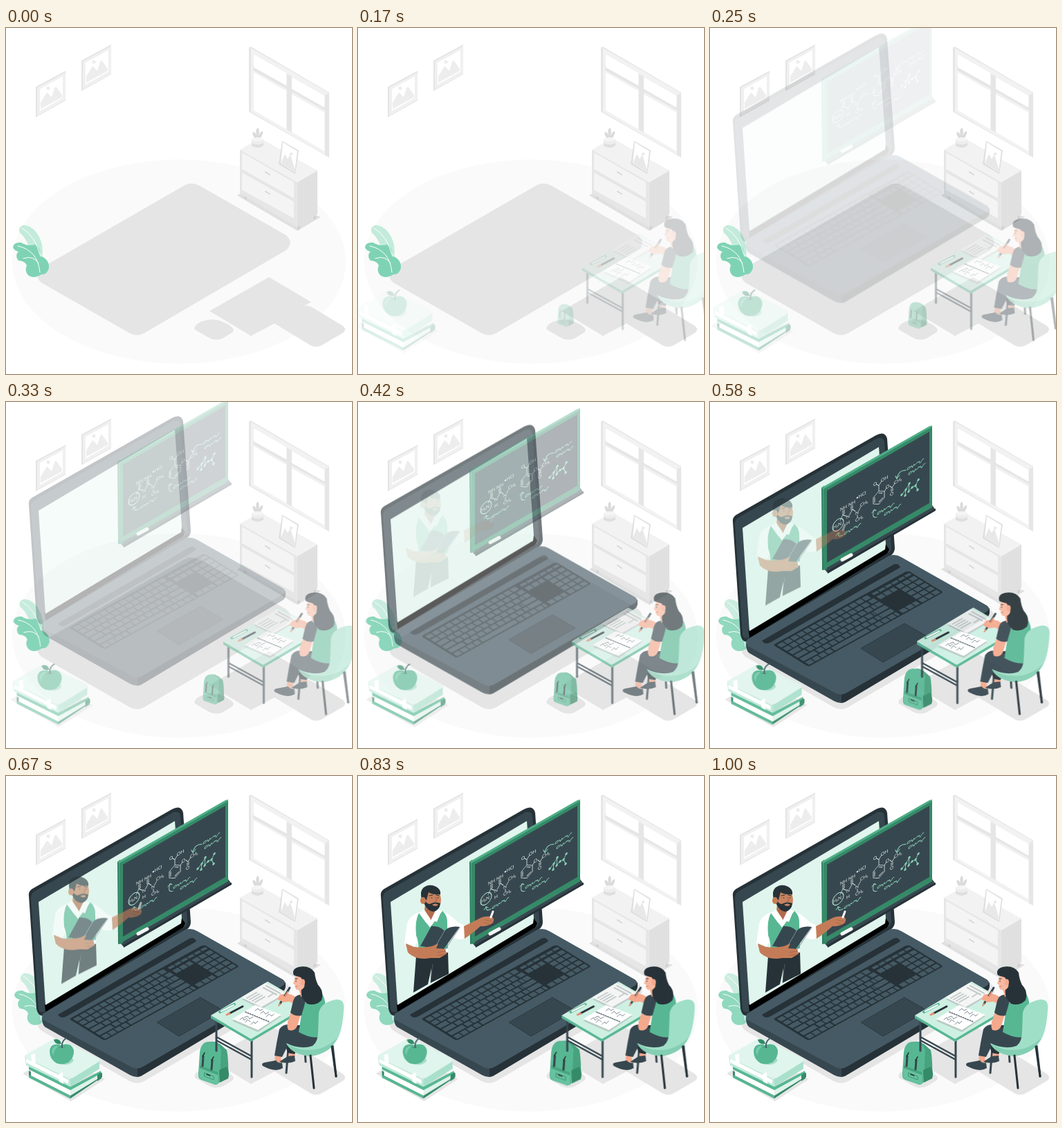
These frames come from a looping animation (500x500 px, 1040 ms). An HTML page:

```html
<!DOCTYPE html>
<html lang="en">
<head>
<meta charset="utf-8">
<title>Online chemistry lesson</title>
<style>
html, body { margin: 0; width: 100%; height: 100%; overflow: hidden; background: #fff; }
svg { display: block; width: 100%; height: 100%; }
text { font: 6.5px Lato, sans-serif; fill: #e6f1ed; }
.ln { fill: none; stroke-linecap: round; stroke-linejoin: round; }

/* 25 pictures per loop, 4% each */
.part { animation: 1040ms linear -4ms infinite; }
#plant { animation-name: pale; }
#laptop { animation-name: drop; }
#board { animation-name: hang; }
#teacher { animation-name: enter; }
#books { --side: -1px; animation-name: slide; }
#student { --side: 1px; animation-name: slide; }
#bag { transform-origin: 300px 416px; animation-name: grow; }

@keyframes pale {
  0%, 24% { opacity: 1; transform: none; animation-timing-function: steps(6); }
  48%, 100% { opacity: .86; transform: translateX(2px); }
}
/* fades gather speed while the moves stay even */
@keyframes drop {
  0%, 16% { opacity: 0; transform: translateY(-50px); animation-timing-function: steps(4); }
  32% { opacity: .28; transform: translateY(-25px); animation-timing-function: steps(4); }
  48%, 100% { opacity: 1; transform: translateY(0); }
}
@keyframes hang {
  0%, 20% { opacity: 0; transform: translateY(-56.25px); animation-timing-function: steps(5); }
  40% { opacity: .4; transform: translateY(-25px); animation-timing-function: steps(4); }
  56%, 100% { opacity: 1; transform: translateY(0); }
}
@keyframes enter {
  0%, 32% { opacity: 0; transform: translateY(-37.5px); animation-timing-function: steps(4); }
  48% { opacity: .21; transform: translateY(-25px); animation-timing-function: steps(8); }
  80%, 100% { opacity: 1; transform: translateY(0); }
}
@keyframes slide {
  0%, 4% { opacity: 0; transform: translateX(calc(var(--side) * 35)); animation-timing-function: steps(14); }
  60% { opacity: 1; transform: translateX(0); }
  64% { transform: translateX(0); animation-timing-function: steps(3); }
  76% { transform: translateX(calc(var(--side) * -2)); animation-timing-function: steps(5); }
  96%, 100% { opacity: 1; transform: translateX(0); }
}
@keyframes grow {
  0%, 4% { opacity: 0; transform: scale(.4); animation-timing-function: steps(14); }
  60% { opacity: 1; transform: scale(1); }
  64% { transform: scale(1); animation-timing-function: steps(3); }
  76% { transform: scale(1.05); animation-timing-function: steps(5); }
  96%, 100% { opacity: 1; transform: scale(1); }
}
</style>
</head>
<body>
<svg viewBox="0 0 500 500">
<defs>
  <g id="picture">
    <path fill="#e4e4e4" d="M43 85 86 62V105L43 129Z"/>
    <path fill="#f0f0f0" d="M45 86 86 64V104L45 127Z"/>
    <path fill="#fff" d="M49 88 82 70V101L49 120Z"/>
    <path fill="#ededed" d="M50 117V108L58 95Q60 92 62 96L66 100 70 87Q72 83 74 87L81 97V100Z"/>
    <circle cx="61" cy="87" r="2.6" fill="#ededed"/>
  </g>
  <path id="squiggle" class="ln" stroke-width=".9" d="M4-3Q0-3 0-1T4-1Q7-4 7-1T10-3Q10 0 13-2T16-2Q18-4 18-1T22-3L24-3"/>
</defs>

<ellipse cx="250" cy="337.500" rx="241" ry="147.500" fill="#fafafa"/>

<g id="room">
  <use href="#picture"/>
  <use href="#picture" x="66" y="-38"/>
  <path fill="#e6e6e6" d="M351 28 354 27 467 93V187L351 121Z"/>
  <path fill="#f2f2f2" d="M354 29 467 94 464 185 354 121Z"/>
  <path fill="#e6e6e6" d="M461 97 467 94V187L461 184ZM406 66 413 70V151L406 147ZM357 54 461 114V119L357 61Z"/>
  <path fill="#fff" d="M358 38 405 65V83L358 57ZM358 64 405 91V146L358 119ZM413 71 460 98V115L413 88ZM413 96 460 122V178L413 150Z"/>

  <path fill="#e0e0e0" d="M334 242 342 237 455 273 421 293Z"/>
  <path class="ln" stroke="#cfcfcf" stroke-width="3" d="M346 240V246M423 285V290M446 270V275"/>
  <path fill="#f2f2f2" d="M338 176 367 159 450 206 421 223Z"/>
  <path fill="#e6e6e6" d="M338 176 421 223V288L338 239Z"/>
  <path fill="#e0e0e0" d="M421 223 450 206V269L421 288Z"/>
  <path fill="#f4f4f4" d="M341 180 416 223V246L341 204ZM341 209 416 251V275L341 234Z"/>
  <path class="ln" stroke="#d8d8d8" stroke-width="2" d="M375 208 381 212M375 236 381 240"/>
  <path fill="#dadada" d="M361 161Q355 154 357 150 361 151 362 156 360 146 364 144 367 147 365 156 367 150 371 149 372 154 366 161Z"/>
  <path fill="#ededed" d="M355 161H372V170Q364 176 355 170Z"/>
  <path fill="#dfdfdf" d="M355 166Q364 171 372 166V170Q364 176 355 170Z"/>
  <ellipse cx="363.500" cy="161" rx="8.500" ry="3" fill="#f5f5f5"/>
  <path fill="#dfdfdf" d="M399 163 423 177 418 211 394 197Z"/>
  <path fill="#fff" d="M400 165 421 178 417 208 397 196Z"/>
  <path fill="#e8e8e8" d="M397 196 403 182 407 189 411 183 418 206 416 207Z"/>
  <circle cx="412" cy="182" r="2" fill="#e8e8e8"/>
</g>

<g id="shadows" fill="#e5e5e5">
  <path d="M255 229Q267 221 280 228L404 299Q417 309 405 321L203 439Q190 448 177 440L51 368Q39 358 54 345Z"/>
  <path d="M294 409 380 360 441 396 430 402Q437 400 443 404L486 430Q494 436 486 441L457 458Q449 463 441 459L388 427 354 445Z"/>
  <path d="M273 436Q270 430 283 424 300 418 314 425 334 434 327 440L314 448Q304 453 294 448Z"/>
</g>

<g id="plant" class="part">
  <path fill="#c3ebdc" d="M52 333Q36 325 30 309 26 301 20 296 16 288 25 285 39 285 48 302 55 315 52 333Z"/>
  <path fill="#7fd3b5" d="M10 317Q11 309 22 310 31 316 42 313 50 317 49 329 63 334 62 347 59 357 51 356 41 363 33 358 26 352 30 343 28 337 18 336 12 329 18 323 12 322 10 317Z"/>
  <path class="ln" stroke="#fff" d="M23 289Q42 300 50 330M17 315Q46 321 49 353M25 333Q40 328 47 340"/>
</g>

<g id="laptop" class="part">
  <path fill="#263238" d="M44 336 33 173Q32 167 38 163L240 48Q253 41 256 53L267 211Q267 218 261 222L55 346Q46 348 44 336Z"/>
  <path fill="#37474f" d="M47 336 36 177Q36 170 41 167L239 54Q250 48 252 58L262 210Q262 216 257 219L57 340Q49 344 47 336Z"/>
  <path fill="#000" d="M56 330 253 204 259 213 256 219 57 341Z"/>
  <path fill="#e0f5ed" d="M47 182 244 65 254 205 253 213 57 331Z"/>
  <path fill="#37474f" d="M52 349 190 421V435Q184 435 179 432L57 363Q52 360 52 349Z"/>
  <path fill="#263238" d="M190 421 404 298V304Q404 309 399 312L198 432Q194 435 190 435Z"/>
  <path fill="#455a64" d="M54 343 259 222Q268 219 276 224L400 294Q407 299 400 303L198 420Q190 425 182 421L55 353Q50 348 54 343Z"/>
  <path fill="#263238" d="M75 345 265 235Q272 232 275 239L88 347Q80 352 75 345Z"/>
  <g transform="matrix(9.6 -5.3 8.1 5 93 351)">
    <path fill="#263238" d="M.2-.1H19.800Q20.200 0 20.200.3V5.900Q20.200 6.200 19.900 6.200H.2Q-.1 6.200-.1 5.900V.2Q-.1-.1.2-.1Z"/>
    <g fill="none" stroke="#455a64" stroke-width=".76" stroke-dasharray=".82 .16">
      <path d="M.2.6H13.900M.2 1.600H13M1.800 2.600H13M2 3.600H12M2.600 4.600H12M.2 5.600H3.900M9.600 5.600H13.900"/>
      <path d="M14.300 1.600H16.900M14.300 5.600H16.900M17.200 1.600H20M17.200 2.600H20M17.200 3.600H20M17.200 4.600H20M17.200 5.600H20"/>
      <path stroke-width=".45" d="M14.300.6H20"/>
      <path stroke-dasharray="none" d="M.2 2.600H1.600M.2 3.600H1.800M.2 4.600H2.400M4.100 5.600H9.400M13.100 1.600H13.900M13.100 2.600H13.900M12.100 3.600H13.900M12.100 4.600H13.900"/>
    </g>
  </g>
  <path fill="#37474f" stroke="#2b3a42" d="M218 356 281 320 314 339 250 376Z"/>
</g>

<g id="board" class="part">
  <path fill="#37474f" d="M163 239 321 149 326 156 170 247Z"/>
  <path fill="#263238" d="M170 244 326 154V157L170 248Z"/>
  <path fill="#2f7d5e" d="M161 124 165 121 169 242 162 243Z"/>
  <path fill="#4fae88" d="M161 124 317 35 321 34V152L164 242 163 126Z"/>
  <path fill="#358a68" d="M164 126 321 36V152L164 242Z"/>
  <path fill="#37474f" d="M169 128 317 43V146L169 232Z"/>
  <path class="ln" stroke="#f5f5f5" stroke-width="5" d="M191 228 204 221"/>
  <g transform="matrix(1 -.565 0 1 169 127)">
    <text x="19" y="42">NH</text><text x="31" y="42">NH</text><text x="42" y="38">•HCl</text>
    <text x="48" y="52">CH₃</text><text x="28" y="58">N</text><text x="41" y="60">N</text>
    <text x="28" y="67">H</text><text x="41" y="70">CH₃</text><text x="9" y="62">H₂N</text>
    <text x="67" y="33">O</text><text x="78" y="33">OH</text><text x="85" y="47">O</text>
    <text x="91" y="61">O</text><text x="97" y="47">CH₃</text>
    <g class="ln" stroke="#e6f1ed" stroke-width=".8">
      <path d="M23 43V49L28 54M23 49 19 55M25 43V49M33 54 37 49 41 54M35 43V49M37 43V49M46 56 49 52M44 61V65"/>
      <path d="M75 44 83 49V58L75 63 67 58V49ZM75 47 80 50M81 57 75 60M69 57V50M75 44V36L71 32M75 36 79 32M83 49 86 46M91 46 94 50 98 46M93 51V55M95 51V55"/>
    </g>
    <g stroke="#8ad3b7" fill="none">
      <circle cx="16" cy="59.500" r="8" stroke="#b8e8d6"/>
      <path class="ln" d="M23 78Q16 79 16 71M13 74 16 71 19 74M72 80Q64 78 68 68M65 70 68 67 71 70M114 36Q104 30 101 40M99 36 101 41 105 38"/>
      <use href="#squiggle" x="25" y="79"/>
      <use href="#squiggle" x="73" y="77"/>
      <use href="#squiggle" x="83" y="84"/>
      <use href="#squiggle" x="116" y="37"/>
      <use href="#squiggle" x="118" y="45"/>
      <path class="ln" d="M108 68 114 64 119 58 118 68 123 66 128 66 132 60M128 66 131 74M114 64 113 72"/>
      <path class="ln" stroke-width="3.400" d="M108 68h.1M114 64h.1M119 58h.1M118 69h.1M123 66h.1M128 66h.1M132 60h.1M131 74h.1M113 72h.1"/>
    </g>
  </g>
</g>

<g id="teacher" class="part">
  <path fill="#263238" d="M84 260 130 254 131 286 105 299 106 278 101 301 80 313Z"/>
  <path class="ln" stroke="#455a64" d="M108 272 105 298"/>
  <path fill="#fff" d="M94 195Q75 200 71 213L67 243 80 248 86 240 88 262 130 255V226Q138 239 153 235L157 217 147 213 131 200 118 194Z"/>
  <path fill="#c47c58" d="M153 217Q168 210 177 205 184 202 193 203 198 206 195 212 188 218 177 217 165 228 154 235 149 229Z"/>
  <path class="ln" stroke="#a5603f" stroke-width=".8" d="M184 208 193 210M183 212 190 214"/>
  <path class="ln" stroke="#fff" stroke-width="3" d="M192 204 195 196"/>
  <path fill="#57b793" d="M88 198 104 219 122 195Q130 202 129 214L130 249 87 258Q89 243 84 230 82 209 88 198Z"/>
  <path fill="#b36c49" d="M97 183 112 188 113 201 105 208 96 198Z"/>
  <path fill="#fff" d="M95 192 105 207 99 213 89 199ZM113 192 120 196 114 211 106 207Z"/>
  <path fill="#c98360" d="M96 170Q105 162 118 167L120 178Q120 191 111 194 102 195 97 185Z"/>
  <path fill="#263238" d="M93 181Q88 167 95 161 103 155 113 160 120 164 119 171 109 172 102 168L99 179 97 180Q101 187 106 184 112 181 119 184 118 194 109 196 100 195 96 185Z"/>
  <ellipse cx="94" cy="180" rx="4" ry="5" fill="#c47c58"/>
  <path fill="#c98360" d="M107 186Q112 183 116 186 112 190 107 186Z"/>
  <path class="ln" stroke="#263238" d="M103 173 108 172M113 172 117 173M106 176h1M115 176h1"/>
  <path class="ln" stroke="#a5603f" d="M112 175 114 180 111 181"/>
  <path fill="#37474f" d="M90 246 106 217Q118 216 125 224 132 216 147 218L124 250Q113 249 108 255 100 245 90 246Z"/>
  <path class="ln" stroke="#78909c" d="M125 224 108 253M147 219 125 252"/>
  <path fill="#c47c58" d="M69 242 81 247Q94 249 107 246L116 242 113 249 126 250 128 257 118 263 105 263Q84 267 72 255Z"/>
  <path class="ln" stroke="#a5603f" stroke-width=".8" d="M115 255 126 253M115 259 124 258"/>
</g>

<g id="books" class="part">
  <path fill="#e5e5e5" d="M24 430 75 401 143 438 94 470Z"/>
  <path fill="#358a68" d="M33 426 93 454 139 429V435L93 466 33 434Z"/>
  <path fill="#fff" d="M36 424 93 451V462L36 433Z"/>
  <path fill="#def3eb" d="M93 451 132 429V438L93 462Z"/>
  <path fill="#57b793" d="M33 419 93 449 137 426V430L93 454 33 424ZM33 432 93 462V466L33 436Z"/>
  <path fill="#358a68" d="M132 432 138 428V437L132 441Z"/>
  <path fill="#bfe9da" d="M27 404 93 439 135 411V423L93 449 29 418Z"/>
  <path fill="#fff" d="M29 408 90 439V445L29 414Z"/>
  <path fill="#a9e0cc" d="M93 437 135 411V423L93 449Z"/>
  <path fill="#e0f5ed" d="M28 403 69 380Q73 378 77 380L134 408Q137 411 134 413L97 436Q93 438 89 436L28 407Q26 405 28 403Z"/>
  <path fill="#fff" d="M36 403 42 401 43 418 37 415ZM76 431 82 428 83 445 77 442Z"/>
  <path fill="#a9dcca" d="M66 407Q79 400 96 408 101 413 89 417 75 419 66 407Z"/>
  <path fill="#57b793" d="M80 389Q94 384 98 396 99 407 90 414 81 418 73 415 63 409 63 398 64 384 80 389Z"/>
  <path fill="#76c9aa" d="M68 393Q73 388 75 391 68 397 69 404 64 399 68 393Z"/>
  <path fill="#358a68" d="M75 391Q81 396 87 390 82 394 75 391Z"/>
  <path class="ln" stroke="#455a64" stroke-width="2" d="M81 392Q80 383 87 379"/>
  <path fill="#358a68" d="M80 387Q71 389 69 381 78 378 80 387Z"/>
</g>

<g id="bag" class="part">
  <path fill="#47a27e" d="M291 387Q298 380 310 388L319 396Q322 410 321 437L301 446Z"/>
  <path fill="#57b793" d="M280 399Q282 385 292 384 307 383 311 396L309 440Q308 446 302 446L282 439Q277 437 278 430Z"/>
  <path fill="#67c2a0" d="M280 418 306 428V444Q304 446 301 445L282 438 279 434Z"/>
  <path fill="#47a27e" d="M280 418 306 428V432L280 422Z"/>
  <path fill="#358a68" d="M308 425 319 420Q324 428 321 437L309 443Z"/>
  <path class="ln" stroke="#358a68" stroke-width=".8" d="M287 429 300 434V439L287 434Z"/>
  <path class="ln" stroke="#37474f" stroke-width="3" d="M285 405 284 419M298 411 297 424"/>
  <path class="ln" stroke="#263238" stroke-width="1.500" d="M284 405 287 400M297 411 300 406M290 431 295 433"/>
</g>

<g id="student" class="part">
  <g class="ln" stroke="#37474f" stroke-width="3">
    <path d="M409 355V395M304 352V397M355 382V435"/>
    <path stroke-width="2.500" d="M304 377 355 405M304 382 355 410"/>
  </g>
  <path fill="#57b793" d="M296 346 354 379 437 331V335L354 384 296 350Z"/>
  <path fill="#cdf0e3" d="M296 346 378 297 437 331 354 380Z"/>
  <path fill="#bfc9c7" d="M341 323 376 302 404 316 369 337Z"/>
  <path fill="#f5f5f5" d="M340 320 375 299 404 314 369 334Z"/>
  <path class="ln" stroke="#c3cccb" stroke-width="2" d="M348 321 362 313M352 323 366 315M356 325 370 317M360 327 374 319M376 303 396 314M372 306 391 316M379 319 387 314"/>
  <path fill="#b9cbc5" d="M327 354 360 334 398 347 364 370Z"/>
  <path fill="#fff" d="M327 351 360 331 398 345 364 367Z"/>
  <path class="ln" stroke="#607178" stroke-width="1.600" stroke-dasharray="1.500 2" d="M346 341 380 355"/>
  <path class="ln" stroke="#607178" stroke-width=".8" d="M338 352l4-3 2 4 4-3M346 356l3-4 4 3M354 359l4-4 2 3 4-4M344 349l5-2 3 4 5-3M360 339l4-3 3 3 4-2M368 343l4-3 3 4 5-3M376 348l4-4 4 3 3-3"/>
  <path class="ln" stroke="#57b793" stroke-width="4" d="M309 341 330 330"/>
  <path class="ln" stroke="#fff" stroke-width="2" d="M311 340 329 331"/>
  <path class="ln" stroke="#263238" stroke-width="3" d="M323 343 342 333"/>
  <path class="ln" stroke="#e88f73" stroke-width="3" d="M319 345 323 343"/>

  <g class="ln" stroke="#37474f" stroke-width="3">
    <path d="M408 394 405 429M432 398 433 413M472 390 477 434"/>
  </g>
  <path fill="#f4a98d" d="M389 402 397 404 398 414 388 414ZM409 394 418 396 417 410 408 408Z"/>
  <path fill="#37474f" d="M390 411Q394 416 399 414L400 422Q390 429 371 419 368 415 374 414ZM407 405 417 404 418 412Q408 417 395 413Z"/>
  <path fill="#263238" d="M409 364Q430 352 452 375L445 396 419 397 417 402 407 400 402 383Z"/>
  <path fill="#37474f" d="M447 371Q454 386 442 394 427 398 408 388L399 406 388 404Q391 385 395 366 402 356 413 361Z"/>
  <path fill="#57b793" d="M424 318Q438 306 455 312 465 325 459 345L455 377Q440 380 423 370L427 344Z"/>
  <path fill="#9fdfc8" d="M405 386Q426 396 443 390 451 384 451 369L452 342Q455 327 477 323 490 322 488 338 486 370 477 383 463 401 440 405 412 402 405 386Z"/>
  <path fill="#84cfb3" d="M405 386Q420 397 441 396 464 394 479 378 470 401 440 405 412 402 405 386Z"/>
  <path class="ln" stroke="#263238" stroke-width="3" d="M440 404 445 451M471 391 477 434"/>
  <path fill="#f4a98d" d="M413 337 427 341 421 361Q417 370 408 367 405 362 408 353Z"/>
  <path fill="#f4a98d" d="M427 324 413 316Q404 313 396 316L392 322 399 327 410 326 420 332Z"/>
  <path fill="#37474f" d="M425 316Q435 321 431 332L427 346Q418 348 411 342L415 325Q417 317 425 316Z"/>
  <path class="ln" stroke="#37474f" stroke-width="3" d="M410 306 396 329"/>
  <path class="ln" stroke="#e88f73" stroke-width="2" d="M407 312 402 320M396 329 394 332"/>
  <path fill="#f4a98d" d="M393 323 400 317 407 322 401 327ZM421 300 432 302 436 315 426 319Z"/>
  <path fill="#f7b89f" d="M419 287 415 300 418 302Q417 311 426 309L433 304 433 286Z"/>
  <path fill="#263238" d="M416 288Q412 279 423 276 439 273 446 284 447 294 451 302 460 311 456 324 447 333 435 329 425 320 427 309 434 305 430 297L426 291Z"/>
  <ellipse cx="429" cy="298" rx="3" ry="4.500" fill="#f4a98d"/>
  <path class="ln" stroke="#263238" d="M418 293 421 293M419 296V297"/>
  <path class="ln" stroke="#d5775f" d="M418 304 421 304"/>
</g>
</svg>
</body>
</html>
```
